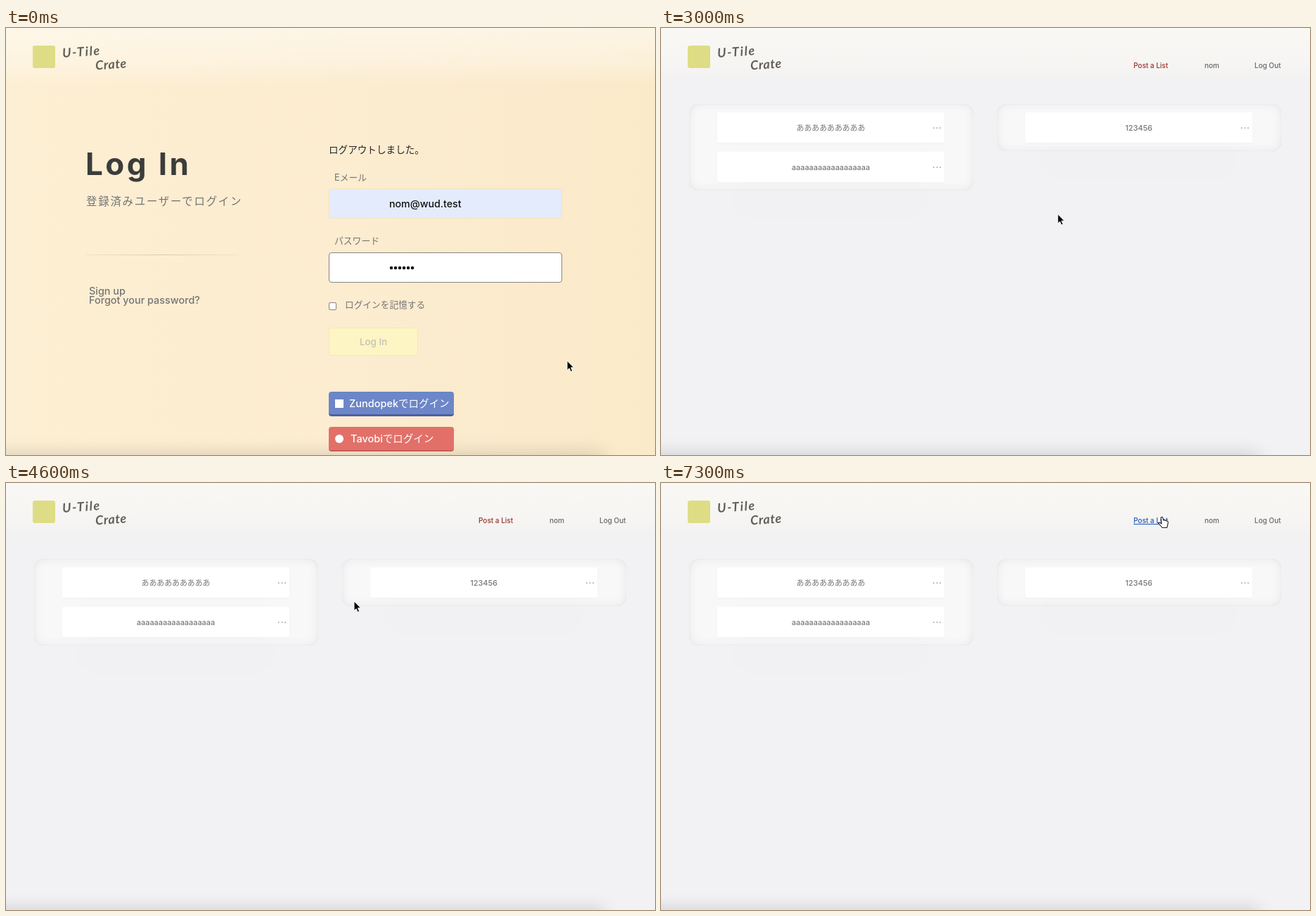
Recreate the animation shown at these times as an HTML page. Size 923 by 607 pixels, loop 7400 ms.

```html
<!DOCTYPE html>
<html lang="ja">
<head>
<meta charset="utf-8">
<title>Login and list board</title>
<style>
html, body { margin: 0; width: 100%; height: 100%; overflow: hidden; }
body { font-family: Inter, "Noto Sans CJK JP", "Noto Sans CJK", sans-serif; color: #747474; }
div, p, svg { position: absolute; box-sizing: border-box; margin: 0; }
p { line-height: 1; white-space: pre; transform: translateY(-50%); }
.full { left: 0; top: 0; width: 923px; height: 607px; overflow: hidden; }
.mid { left: 50%; transform: translate(-50%, -50%); }

#login { background: linear-gradient(90deg, #fdefd3, #fcecd0 55%, #faeac9); }
#glow { background: linear-gradient(90deg, #fef8e5, #fef5e0 55%, #fcf1da); }
.sheen { left: 0; top: 0; width: 923px; height: 82px;
  background: linear-gradient(rgba(255,255,255,.5), rgba(255,255,255,.28) 62%, rgba(255,255,255,0)); }
.floor { left: -30px; top: 607px; width: 880px; height: 20px; box-shadow: 0 0 26px rgba(0,0,0,.18); }

.label { left: 467px; font-size: 12.8px; }
.field { left: 459px; width: 332px; height: 43px; border: 1px solid #f3e4c0; border-radius: 4px; background: #fff; }
.check { left: 459px; top: 390px; width: 11px; height: 11px; border: 1px solid #858585; border-radius: 2px; background: #fff; }
.rule { left: 114px; top: 322px; width: 217px; height: 1px;
  background: linear-gradient(90deg, rgba(190,172,145,.2), rgba(190,172,145,.55) 50%, rgba(190,172,145,.15)); }
#submit { --h: 0; left: 459px; top: 426px; width: 127px; height: 40px; border-radius: 4px;
  border: 1px solid color-mix(in srgb, #f6e8b4, #f0cd8c calc(var(--h) * 100%));
  background: color-mix(in srgb, #fdf5c4, #ecb45c calc(var(--h) * 100%));
  color: color-mix(in srgb, #c6c0b4, #fff6e6 calc(var(--h) * 100%)); }
.social { left: 459px; width: 178px; height: 35px; border-radius: 4px; color: #fff; font-size: 14.5px; font-weight: 500; }
.social div { left: 9px; top: 11px; width: 12px; height: 12px; background: #fff; }
#status { left: 0; top: 591px; width: 305px; height: 16px; border-radius: 0 4px 0 0; background: #303134; color: #c4c5c7; }

#board { background: #f2f1f3; }
#board .sheen { background: linear-gradient(#f9f8f5, #f6f5f3 62%, #f2f1f3); }
.group { top: 108px; width: 404px; border-radius: 13px; background: #f8f8f8;
  box-shadow: inset 0 0 14px rgba(0,0,0,.075), inset 0 0 1px rgba(0,0,0,.12); }
.card { --h: 0; width: 323px; height: 43px; border-radius: 2px; background: #fff;
  transform: translateY(calc(var(--h) * -1.5px));
  color: color-mix(in srgb, #777, #444 calc(var(--h) * 100%));
  box-shadow: 0 2px 4px rgba(0,0,0,.025),
    0 46px 56px -16px rgba(0,0,0,calc(.045 * (1 - var(--h)))),
    0 4px 14px rgba(0,0,0,calc(.15 * var(--h))),
    0 26px 44px -6px rgba(0,0,0,calc(.15 * var(--h))); }
.card p { top: 22px; font-size: 10.9px; font-weight: 500; }
.card .more { left: 306px; top: 19px; color: #999; font-weight: 700; letter-spacing: 1px; }
.nav { top: 53px; font-size: 10px; font-weight: 500; color: #666; }

#alert { left: 269px; top: 0; width: 384px; height: 210px; overflow: hidden; background: #242629; border-radius: 0 0 3px 3px; }
#shade { left: 269px; top: 0; width: 384px; height: 210px; box-shadow: 0 2px 7px rgba(0,0,0,.3); }
#alert .note { left: 14px; font-size: 10.6px; color: #9da0a5; }
.ok { left: 315px; top: 169px; width: 55px; height: 28px; border-radius: 3px; background: #82a9f6; color: #202a40; }

.square { left: 38px; top: 25px; width: 32px; height: 32px; border-radius: 3px; background: #dedd86; }
.word { color: #625f59; font: italic 700 18px Lato, sans-serif; transform: translateY(-50%) rotate(-4deg); }
</style>
</head>
<body>
<div class="full">
  <div id="login" class="full">
    <div id="glow" class="full"></div>
    <div class="sheen"></div><div class="floor"></div>
    <p style="left:113px;top:193px;font-size:44px;font-weight:700;letter-spacing:3.4px;color:#3c3c3b">Log In</p>
    <p style="left:114px;top:247px;font-size:15.4px;letter-spacing:1.8px;font-weight:500">登録済みユーザーでログイン</p>
    <div class="rule"></div>
    <p style="left:118px;top:374px;font-size:14.4px;font-weight:500">Sign up</p>
    <p style="left:118px;top:387px;font-size:14.4px;font-weight:500">Forgot your password?</p>

    <p style="left:459px;top:174px;font-size:13.6px;color:#252525">ログアウトしました。</p>
    <p class="label" style="top:213px">Eメール</p>
    <div class="field" style="top:228px;background:#e4ebfd"></div>
    <p style="left:545px;top:250px;font-size:14.2px;font-weight:500;color:#111">nom@wud.test</p>
    <p class="label" style="top:303px">パスワード</p>
    <div id="password" class="field" style="top:319px"></div>
    <svg style="left:545px;top:338px" width="36" height="6">
      <path d="M3 3H34" stroke="#111" stroke-width="4.6" stroke-linecap="round" stroke-dasharray="0 6"/>
    </svg>
    <div class="check"></div>
    <p style="left:482px;top:394px;font-size:12.7px">ログインを記憶する</p>
    <div id="submit"><p class="mid" style="top:20px;font-size:13.4px;font-weight:500">Log In</p></div>
    <div class="social" style="top:517px;background:#6c86c8;border-bottom:3px solid #4a60a4">
      <div></div><p style="left:29px;top:17px">Zundopekでログイン</p>
    </div>
    <div class="social" style="top:567px;background:#e27069;border-bottom:2px solid #c85b57">
      <div style="border-radius:50%"></div><p style="left:31px;top:17px">Tavobiでログイン</p>
    </div>
    <div id="status"><p style="left:1px;top:10px;font-size:9.6px">リクエストを処理しています...</p></div>
  </div>

  <div id="board" class="full">
    <div class="sheen"></div><div class="floor"></div>
    <p id="post" class="nav" style="left:672px">Post a List</p>
    <p class="nav" style="left:773px">nom</p>
    <p class="nav" style="left:844px">Log Out</p>
    <div class="group" style="left:40px;height:123px"></div>
    <div class="group" style="left:478px;height:67px"></div>
    <div class="card" style="left:80px;top:120px"><p class="mid">あああああああああ</p><p class="more">...</p></div>
    <div id="second" class="card" style="left:80px;top:176px"><p class="mid">aaaaaaaaaaaaaaaaaa</p><p class="more">...</p></div>
    <div id="third" class="card" style="left:518px;top:120px"><p class="mid">123456</p><p class="more">...</p></div>
  </div>

  <div class="square"></div>
  <p class="word" style="left:80px;top:33px;letter-spacing:1.6px">U-Tile</p>
  <p class="word" style="left:127px;top:51px;letter-spacing:.6px">Crate</p>

  <div id="warning" class="full">
    <div id="shade"></div>
    <div id="alert">
      <svg width="384" height="68" fill="none" stroke="#3e4044" stroke-width="1">
        <path d="M0 0H384V68H0Z" fill="#202124" stroke="none"/>
        <path d="M0 28C14 22 24 25 34 34S60 46 78 39" stroke-width="5"/>
        <path d="M45 3V20M37 7L53 16M53 7L37 16" stroke-width="3"/>
        <path d="M96 0V54Q96 60 102 60H148Q154 60 154 54V0M154 46H218V0M154 50H229M219 20Q219 6 232 0"/>
        <path d="M351 25A7.5 7.5 0 0 1 366 25Z" fill="#3e4044" stroke="none"/>
        <path d="M144 14H194V34H144Z" fill="#26282d"/>
        <path d="M126 6L146 38H105Z" fill="#ee7b70" stroke="#ee7b70" stroke-linejoin="round"/>
        <path d="M126 17V27M126 31V34" stroke="#202124" stroke-width="3"/>
        <path d="M187 18V30" stroke="#8ab4f8" stroke-width="2"/>
      </svg>
      <p style="left:146px;top:27px;font-size:19px;font-weight:600;letter-spacing:1.5px;color:#82a9f6">***</p>
      <p style="left:14px;top:91px;font-size:13px;color:#e8eaed">パスワードを変更してください</p>
      <p class="note" style="top:123px">サイトまたはアプリでのデータ侵害により、パスワード情報が漏洩しました。</p>
      <p class="note" style="top:140px">localhost:3000 のパスワードを今すぐ変更することをおすすめします。</p>
      <svg style="left:14px;top:176px" width="14" height="14" fill="none" stroke="#505257">
        <circle cx="7" cy="7" r="5.5"/><path d="M7 6V10M7 4V5"/>
      </svg>
      <div class="ok"><p class="mid" style="top:14px;font-size:10.5px;font-weight:600">OK</p></div>
    </div>
  </div>

  <svg id="cursor" style="left:0;top:0;overflow:visible" width="18" height="20" stroke-linejoin="round">
    <path id="arrow" d="M0 0V13.5L3.1 10.8L5.2 15.6L7.6 14.5L5.5 9.8H9.6Z" fill="#000" stroke="#fff"/>
    <path id="hand" d="M0 1.2Q1.4 -.8 2.6 1.2L3.5 5Q5.5 4 6 5.5Q8 4.7 8.4 6.2Q10.3 5.7 10.2 8L9.5 12L8.5 15.5H2L-3.5 9.4Q-3.2 7.4 -1.2 8.6L1 10Z" fill="#fff" stroke="#222" stroke-width="1.1"/>
  </svg>
</div>

<script>
const LOOP = 7400, STEP = 100;
const $ = id => document.getElementById(id);
const show = (id, on) => $(id).style.display = on ? "" : "none";
const hover = (id, amount) => $(id).style.setProperty("--h", amount);
const ramp = (t, from, to) => Math.min(1, Math.max(0, (t - from) / (to - from)));
const ease = u => u * u * (3 - 2 * u);
const pulse = (t, start, end) => ease(ramp(t, start, start + 300)) * (1 - ease(ramp(t, end, end + 300)));

// time, x, y of the pointer tip
const route = [
  [0, 798, 473], [900, 558, 437], [2400, 559, 437], [2600, 559, 437],
  [3200, 566, 204], [4000, 566, 204], [4200, 606, 186], [4300, 604, 184],
  [4600, 495, 168], [4800, 470, 173], [5300, 311, 195], [5700, 311, 195],
  [6300, 690, 150], [6500, 690, 150], [6900, 714, 20], [7200, 711, 48], [LOOP, 711, 48]
];

function pointer(t) {
  const i = route.findIndex(stop => stop[0] > t);
  const [t0, x0, y0] = route[i - 1], [t1, x1, y1] = route[i];
  const u = ease(ramp(t, t0, t1));
  return [x0 + (x1 - x0) * u, y0 + (y1 - y0) * u];
}

function draw(t) {
  const onBoard = t >= 2900, onLink = t >= 7300;
  const hand = onLink || (t >= 800 && t < 2500);
  const [x, y] = pointer(t);

  show("login", !onBoard);
  show("board", onBoard);
  show("status", t >= 2500);
  show("warning", t >= 3400 && t < 4300);
  show("hand", hand);
  show("arrow", !hand);

  $("glow").style.opacity = ramp(t, 0, 1300);
  $("password").style.borderColor = t < 2500 ? "#858585" : "#f3e4c0";
  $("post").style.color = onLink ? "#1f55b5" : "#98312a";
  $("post").style.textDecoration = onLink ? "underline" : "none";
  hover("submit", ramp(t, 800, 1200));
  hover("second", pulse(t, 5000, 5900));
  hover("third", pulse(t, 6100, 6600));
  $("cursor").style.transform = `translate(${x}px, ${y}px)`;
}

const start = performance.now();
function tick() {
  const t = (performance.now() - start) % LOOP;
  draw(Math.floor(t / STEP) * STEP);
  requestAnimationFrame(tick);
}
tick();
</script>
</body>
</html>
```
